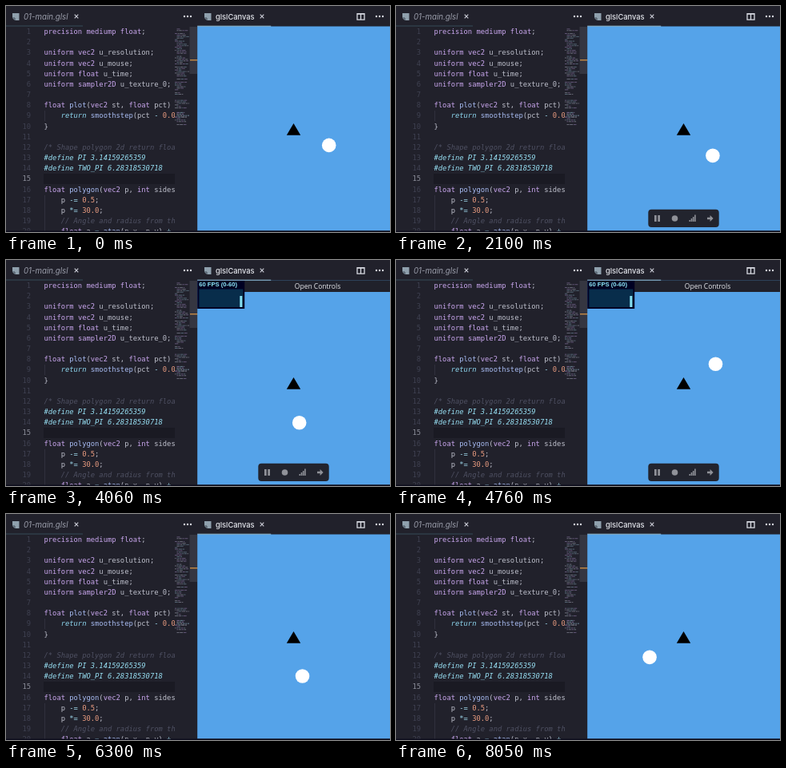
Animation, 480 px wide and 283 px high, one loop 8.12 s. Source, as an HTML page:

```html
<!DOCTYPE html>
<html lang="en">
<head>
<meta charset="utf-8">
<title>Shader editor</title>
<style>
  html, body { margin: 0; width: 100%; height: 100%; overflow: hidden; background: #21212b; }
  svg { display: block; width: 480px; height: 283px; }
  text { white-space: pre; }
  #code text { font: 8.8px "DejaVu Sans Mono", monospace; fill: #bfc1cd; }
  #code .num { fill: #3f4151; text-anchor: end; }
  #code .current { fill: #8d8f9b; }
  .type { fill: #cba8f0; }
  .return { fill: #8fd8f0; font-style: italic; }
  .op { fill: #9fd8ec; }
  .value { fill: #ee9f82; }
  .call { fill: #a9bdf4; }
  .comment { fill: #4f5163; font-style: italic; }
  .define { fill: #97dff3; font-style: italic; }
  .tab { font: 500 9.3px Inter, sans-serif; fill: #e6e8ee; }
  .idle { font: italic 9.7px Inter, sans-serif; fill: #9b9eab; }
</style>
</head>
<body>
<svg viewBox="0 0 480 283">
  <defs>
    <g id="file"><path d="M0 0h8.5v9h-5.5l-3-3z" fill="#8fa0ad"/><path d="M0 6h3v3" fill="none" stroke="#3a4552" stroke-width=".9"/></g>
    <path id="close" d="M-2.3-2.3l4.6 4.6M2.3-2.3l-4.6 4.6" stroke="#c8cad4" stroke-width="1.2"/>
    <g id="more" fill="#d8dae2"><circle cx="-4" r="1.2"/><circle r="1.2"/><circle cx="4" r="1.2"/></g>
  </defs>
  <rect width="480" height="283" fill="#21212b"/>
  <rect x="47" y="210" width="164" height="13" fill="#1a1a23"/>
  <path d="M48.5 131v13M48.5 237v46" stroke="#363746" stroke-width=".7"/>
  <g id="code"></g>

  <rect x="211" y="26" width="29" height="257" fill="#21212b"/>
  <g id="map"></g>
  <rect x="229.5" y="26" width="10" height="59" fill="#353641"/>
  <path d="M230 67.7h10" stroke="#c58a45" stroke-width="1.4"/>

  <path d="M0 25h96" stroke="#3c5663" stroke-width=".8"/>
  <use href="#file" x="8" y="9"/>
  <text class="idle" x="22" y="16.5">01-main.glsl</text>
  <use href="#close" x="88" y="13"/>
  <use href="#more" x="227" y="13"/>
  <use href="#file" x="248" y="9"/>
  <text class="tab" x="262" y="16.5">glslCanvas</text>
  <use href="#close" x="320" y="13"/>
  <path d="M439 9.7h9v7.5h-9zM443.5 9.5v8M439 10h9" fill="none" stroke="#d8dae2" stroke-width="1.3"/>
  <use href="#more" x="467" y="13"/>

  <rect x="239.2" y="25.5" width="240.8" height="256" fill="#55a3e9"/>
  <path d="M359.5 147l8.7 14.7h-17.4z"/>
  <circle id="ball" r="8.8" fill="#fff"/>

  <g id="panel">
    <rect x="298" y="25.5" width="182" height="14.5" fill="#20212b"/>
    <text x="389.5" y="35.9" text-anchor="middle" fill="#e6e8ec" font-family="'Open Sans', sans-serif" font-size="8.5">Open Controls</text>
    <rect x="239.2" y="25.5" width="59" height="35.5" fill="#000022"/>
    <text id="fps" x="241.3" y="33.3" fill="#8fe8f5" font-family="'Liberation Sans', Arial, sans-serif" font-size="7.6" font-weight="700"></text>
    <rect x="241.3" y="36.5" width="55" height="22.5" fill="#082d4b"/>
    <rect id="bars" y="45" height="14" fill="#86dff0"/>
  </g>
  <path d="M239.2 25.2h92" stroke="#a3d3ee" stroke-width=".9"/>
  <g id="tools">
    <rect x="315.3" y="254.7" width="88.4" height="22.3" rx="4" fill="#22242e"/>
    <g fill="#8f9198">
      <path d="M323 262h2.7v8h-2.7zM327.3 262h2.7v8h-2.7z"/>
      <circle cx="348.5" cy="266" r="3.8"/>
      <path d="M366.5 268h1.6v2h-1.6zM368.7 266h1.6v4h-1.6zM370.9 264h1.6v6h-1.6zM373.1 261.5h1.6v8.5h-1.6z"/>
      <path d="M389 264.8h3.6v-2.8l4 4-4 4v-2.8h-3.6z"/>
    </g>
  </g>
  <rect y="281.5" width="480" height="1.5" fill="#0d0d1c"/>
</svg>
<script>
const $ = id => document.getElementById(id);
const LOOP = 8120, STEP = 70;

const source = `precision mediump float;

uniform vec2 u_resolution;
uniform vec2 u_mouse;
uniform float u_time;
uniform sampler2D u_texture_0;

float plot(vec2 st, float pct) {
    return smoothstep(pct - 0.02,
}

/* Shape polygon 2d return float
#define PI 3.14159265359
#define TWO_PI 6.28318530718

float polygon(vec2 p, int sides
    p -= 0.5;
    p *= 30.0;
    // Angle and radius from the
    float a = atan(p.x, p.y) + PI`;

const rules = [
  ['comment', /^\s*\/[\/*].*/],
  ['define', /^#.*/],
  ['type', /^(precision|mediump|float|uniform|vec2|sampler2D|int)\b/],
  ['return', /^return\b/],
  ['call', /^\w+(?=\()/],
  ['value', /^\d+\.\d+/],
  ['op', /^[-+*=]+/],
  ['', /^(\w+|\s+|.)/]
];

function paint(line) {
  let out = '';
  while (line) {
    const [name, rule] = rules.find(([, r]) => r.test(line));
    const part = line.match(rule)[0];
    out += `<tspan class="${name}">${part}</tspan>`;
    line = line.slice(part.length);
  }
  return out;
}

$('code').innerHTML = source.split('\n').map((line, i) => {
  const y = 35.1 + i * 13.17;
  const current = i === 14 ? ' current' : '';
  return `<text class="num${current}" x="31" y="${y}">${i + 1}</text>` +
    `<text x="47.5" y="${y}">${paint(line)}</text>`;
}).join('');

// Minimap: short seeded dashes standing for code
let seed = 11;
const random = () => (seed = seed * 16807 % 2147483647) / 2147483647;
let dashes = '';
for (let y = 26.5; y < 150; y += 1.9) {
  if (random() < 0.2) continue;
  let x = 211 + (random() < 0.5 ? 2.5 : 0);
  const end = x + 4 + random() * 13;
  const bright = y > 132 && y < 139 ? 0.85 : 0.6;
  while (x < Math.min(end, 228)) {
    const w = 1 + random() * 3.5;
    const color = ['#a6a8b8', '#9681b3', '#7d9daf'][Math.floor(random() * 3)];
    dashes += `<rect x="${x}" y="${y}" width="${Math.min(w, 229 - x)}" height=".9" fill="${color}" opacity="${bright}"/>`;
    x += w + 0.7;
  }
}
$('map').innerHTML = dashes;

const ramp = (t, from, to) => Math.max(0, Math.min(1, (t - from) / (to - from)));

function draw() {
  const t = Math.floor(performance.now() % LOOP / STEP) * STEP;
  const angle = (22 - 0.1628 * t) * Math.PI / 180;
  $('ball').setAttribute('cx', 359.2 + 48 * Math.cos(angle));
  $('ball').setAttribute('cy', 156.4 + 48 * Math.sin(angle));

  const fade = 1 - ramp(t, 5580, 5930);
  $('tools').setAttribute('opacity', ramp(t, 980, 1330) * fade);
  $('panel').setAttribute('opacity', t < 2660 ? 0 : fade);
  $('fps').textContent = (t < 3780 ? 0 : 60) + ' FPS (0-60)';
  const width = t < 4900 ? 3 : 5;
  $('bars').setAttribute('x', 295.3 - width);
  $('bars').setAttribute('width', width);
  requestAnimationFrame(draw);
}
draw();
</script>
</body>
</html>
```
